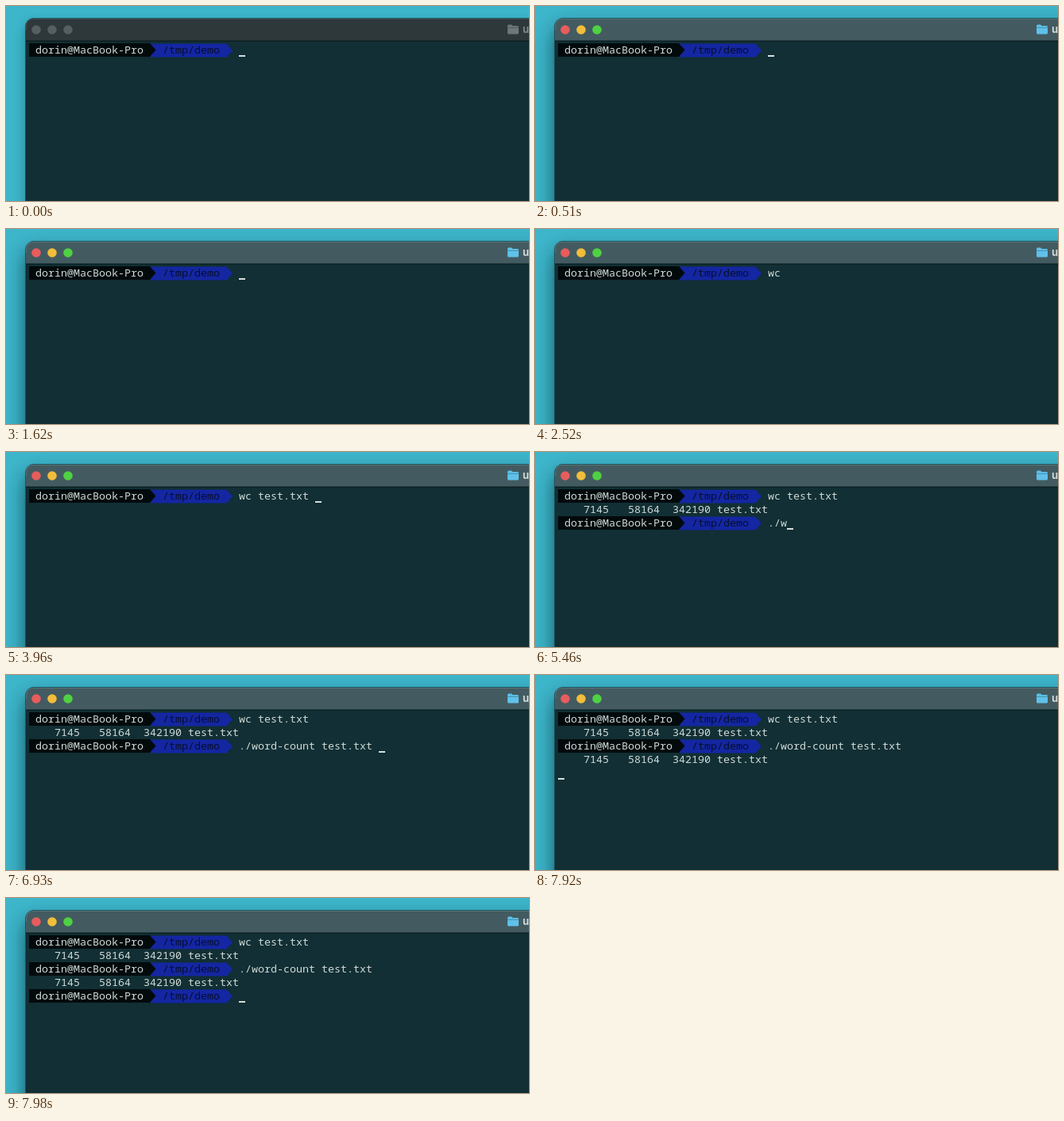
An HTML page for the animation above (8 s loop, 658 px wide and 246 px high).

```html
<!DOCTYPE html>
<html lang="en">
<head>
<meta charset="utf-8">
<title>Terminal</title>
<style>
  html, body { margin: 0; width: 100%; height: 100%; overflow: hidden; background: #3db5ca; }
  svg { display: block; width: 658px; height: 246px; }
  .mono text { font: 13.333px "Noto Sans Mono", "DejaVu Sans Mono", monospace; white-space: pre; fill: #cfd9d6; }
  .mono .path { fill: #060f30; }
  .title { font: bold 13px Inter, "Open Sans", sans-serif; }
</style>
</head>
<body>
<svg id="stage" viewBox="0 0 658 246" xmlns="http://www.w3.org/2000/svg">
  <defs>
    <filter id="wide" filterUnits="userSpaceOnUse" x="-60" y="-60" width="800" height="460">
      <feGaussianBlur stdDeviation="12"/>
    </filter>
    <filter id="tight" filterUnits="userSpaceOnUse" x="-60" y="-60" width="800" height="460">
      <feGaussianBlur stdDeviation="7"/>
    </filter>
    <filter id="soft" filterUnits="userSpaceOnUse" x="170" y="40" width="130" height="110">
      <feGaussianBlur stdDeviation=".6"/>
    </filter>
  </defs>
  <rect width="658" height="246" fill="#3db5ca"/>
  <rect id="shadow" x="24" width="800" height="400" rx="12" fill="#04252d"/>
  <rect x="24.500" y="15.500" width="800" height="400" rx="10.500" fill="#112f34" stroke="#1d5560"/>
  <path id="bar" d="M25 44V26Q25 16 35 16H658V44Z"/>
  <path id="edge" d="M25.500 30V26.500Q25.500 16.500 35.500 16.500H658" fill="none"/>
  <rect x="25" y="43.500" width="633" height="1.200" fill="#0b1c1f"/>
  <g id="lights"></g>
  <g id="folder">
    <path d="M631 25Q631 23.500 632.500 23.500H636L637.500 25H643.500Q645 25 645 26.500V34Q645 35.500 643.500 35.500H632.500Q631 35.500 631 34Z"/>
    <path d="M631 27.300H645" stroke="#133136" stroke-opacity=".35"/>
  </g>
  <text id="title" class="title" x="650" y="34">u</text>
  <g id="screen" class="mono"></g>
  <rect id="cursor" width="8" height="2" fill="#d6dfdd"/>
</svg>
<script>
const LOOP = 8000, LEFT = 29, CELL = 8, ROW = 17, PROMPT_COLS = 33;
const NS = "http://www.w3.org/2000/svg";
const $ = id => document.getElementById(id);

function add(parent, tag, attrs, text) {
  const el = document.createElementNS(NS, tag);
  for (const k in attrs) el.setAttribute(k, attrs[k]);
  if (text !== undefined) el.textContent = text;
  return parent.appendChild(el);
}

function set(id, attrs) {
  for (const k in attrs) $(id).setAttribute(k, attrs[k]);
}

const colX = col => LEFT + col * CELL;
const baseline = row => 60 + row * ROW;

const COUNTS = "    7145   58164  342190 test.txt";

// Each key is [time, text typed so far]
const commands = [
  { row: 0, shown: 0, keys: [[0, ""], [1680, "w"], [1890, "wc"], [2040, "wc "],
    [2640, "wc t"], [2760, "wc te"], [3030, "wc test.txt "]] },
  { row: 2, shown: 4080, keys: [[4080, ""], [4860, "."], [5130, "./"], [5460, "./w"],
    [5580, "./wo"], [5760, "./word-count "], [6570, "./word-count t"],
    [6630, "./word-count te"], [6930, "./word-count test.txt "]] },
  { row: 4, shown: 7950, keys: [[7950, ""]] }
];
const outputs = [{ row: 1, shown: 4050 }, { row: 3, shown: 7920 }];
const blinkOff = [[1140, 1620], [2520, 2640], [3480, 3960], [6360, 6570]];
// Cursor waits at the start of the next line after Enter
const waits = [{ from: 3990, to: 4080, row: 1 }, { from: 7530, to: 7950, row: 3 }];

const screen = $("screen");
for (const c of commands) {
  const g = c.el = add(screen, "g", {});
  const top = 47 + c.row * ROW, y = baseline(c.row);
  const arrow = (x1, x2, dy, attrs) => add(g, "path", {
    d: `M${x1} ${top + dy}H${x2}l7.500 8.500l-7.500 8.500H${x1}Z`, ...attrs
  });
  arrow(182, 277.5, 0.5, { fill: "#1426a2", filter: "url(#soft)" });
  arrow(29, 181, 0, { fill: "#030a0c" });
  add(g, "text", { x: colX(1), y }, "dorin@MacBook-Pro");
  add(g, "text", { x: colX(21), y, class: "path" }, "/tmp/demo");
  c.text = add(g, "text", { x: colX(PROMPT_COLS), y }, "");
}
for (const o of outputs) {
  o.el = add(screen, "text", { x: LEFT, y: baseline(o.row) }, COUNTS);
}

const lights = [["#e85c5c", 38], ["#f2bd3a", 58], ["#4fd143", 78]].map(([color, cx]) => ({
  color, el: add($("lights"), "circle", { cx, cy: 30, r: 5.8 })
}));

function drawWindow(active) {
  set("shadow", active
    ? { y: 28, filter: "url(#wide)", opacity: .66 }
    : { y: 22, filter: "url(#tight)", opacity: .36 });
  set("bar", { fill: active ? "#435b60" : "#2e3739" });
  set("edge", { stroke: active ? "#72878b" : "#566467", "stroke-opacity": .55 });
  set("folder", { fill: active ? "#5fc1ea" : "#6c7779" });
  set("title", { fill: active ? "#d0d9da" : "#7d8789" });
  for (const l of lights) l.el.setAttribute("fill", active ? l.color : "#535f61");
}

function draw(t) {
  drawWindow(t >= 510);
  let col = 0, row = 0;
  for (const c of commands) {
    const on = t >= c.shown;
    c.el.setAttribute("visibility", on ? "visible" : "hidden");
    if (!on) continue;
    const typed = c.keys.filter(k => k[0] <= t).pop()[1];
    c.text.textContent = typed;
    col = PROMPT_COLS + typed.length;
    row = c.row;
  }
  for (const o of outputs) o.el.setAttribute("visibility", t >= o.shown ? "visible" : "hidden");

  const wait = waits.find(w => t >= w.from && t < w.to);
  if (wait) {
    col = 0;
    row = wait.row + (t >= outputs.find(o => o.row === wait.row).shown ? 1 : 0);
  }
  const off = blinkOff.some(([a, b]) => t >= a && t < b);
  set("cursor", { x: colX(col), y: 62 + row * ROW, visibility: off ? "hidden" : "visible" });
}

const start = performance.now();
function tick() {
  draw((performance.now() - start) % LOOP);
  requestAnimationFrame(tick);
}
tick();
</script>
</body>
</html>
```
